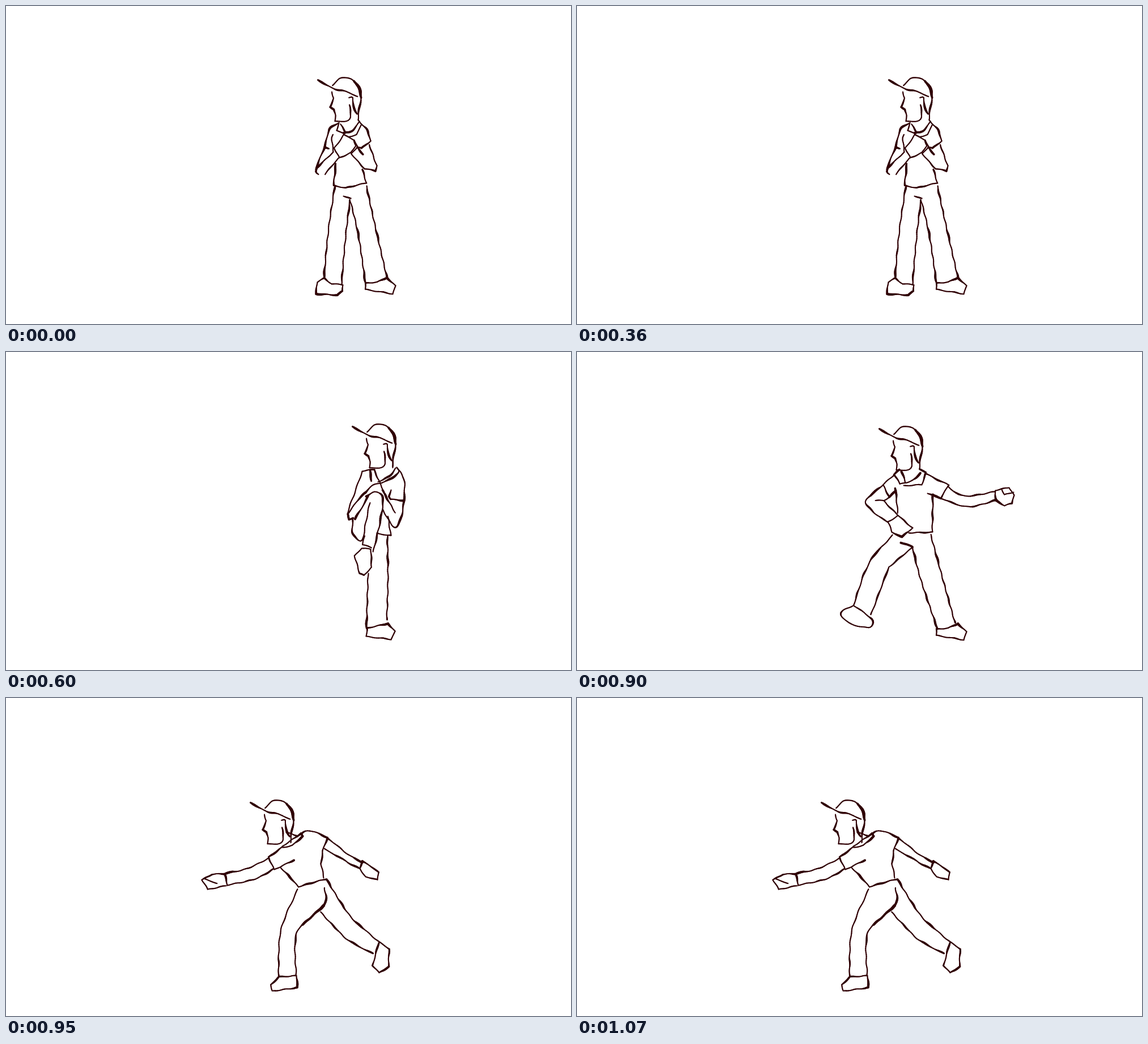
Animation of 997 by 561 pixels, one loop 1150 ms. Source, as an HTML page with a canvas:

```html
<!DOCTYPE html>
<html lang="en">
<head>
<meta charset="utf-8">
<title>Bowler sketch</title>
<style>
html, body { margin: 0; width: 100%; height: 100%; overflow: hidden; background: #fff; }
canvas { display: block; }
</style>
</head>
<body>
<canvas id="stage" width="997" height="561"></canvas>
<script>
const ctx = document.getElementById('stage').getContext('2d');
ctx.strokeStyle = '#300005';
ctx.lineCap = 'round';

// Brush pressure and tremble depend only on the place on the paper.
const pressure = (x, y) => 2.1 + 2.2 * Math.max(0, Math.sin(x / 13 + y / 9) * Math.sin(y / 17 - x / 11));
const tremble = t => 0.6 * Math.sin(t / 4);

function brush(samples, extra) {
  const shaky = samples.map(([x, y]) => [x + tremble(y + x / 2), y + tremble(x - y / 3)]);
  for (let i = 1; i < shaky.length; i++) {
    ctx.lineWidth = pressure(...samples[i]) + extra;
    ctx.beginPath();
    ctx.moveTo(...shaky[i - 1]);
    ctx.lineTo(...shaky[i]);
    ctx.stroke();
  }
}

function toPoints(coords) {
  const points = [];
  for (let i = 0; i < coords.length; i += 2) points.push([coords[i], coords[i + 1]]);
  return points;
}

// Catmull-Rom through the points, or straight edges when bend is 0.
function trace(coords, bend, extra = 0) {
  const points = toPoints(coords);
  const at = i => points[Math.max(0, Math.min(points.length - 1, i))];
  const samples = [points[0]];
  for (let i = 0; i + 1 < points.length; i++) {
    const [p, a, b, n] = [at(i - 1), at(i), at(i + 1), at(i + 2)];
    const steps = Math.ceil(Math.hypot(b[0] - a[0], b[1] - a[1]) / 3);
    for (let s = 1; s <= steps; s++) {
      const t = s / steps;
      samples.push([0, 1].map(k => {
        if (!bend) return a[k] + (b[k] - a[k]) * t;
        const m = (b[k] - p[k]) / 2, q = (n[k] - a[k]) / 2, d = b[k] - a[k];
        return a[k] + m * t + (3 * d - 2 * m - q) * t * t + (m + q - 2 * d) * t * t * t;
      }));
    }
  }
  brush(samples, extra);
}

const line = (...coords) => trace(coords, false);
const curve = (...coords) => trace(coords, true);
const heavy = (...coords) => trace(coords, true, 1.6);

function head(dx, dy) {
  ctx.save();
  ctx.translate(dx, dy);
  curve(550, 130, 576, 145, 600, 151, 621, 160);
  curve(576, 140, 590, 128, 605, 127, 619, 139, 627, 156, 623, 182, 621, 201);
  heavy(614, 133, 622, 143, 627, 162);
  line(575, 152, 578, 163, 572, 178, 579, 183, 581, 193, 581, 203);
  curve(581, 203, 595, 204, 608, 197, 606, 175);
  curve(605, 162, 612, 161, 613, 178, 620, 190);
  ctx.restore();
}

function plantedShoe() {
  line(672, 479, 687, 494, 683, 508, 634, 500, 634, 489, 655, 487, 672, 479);
}

function waiting() {
  head(0, 0);
  // collar
  line(588, 206, 583, 219, 598, 226);
  line(590, 209, 600, 224);
  curve(596, 224, 613, 219, 624, 203);
  line(621, 201, 628, 208, 618, 227, 604, 231);
  // arms and hands
  curve(587, 207, 571, 217, 562, 249, 547, 288, 552, 297);
  line(562, 249, 569, 251);
  curve(577, 227, 575, 237, 578, 258);
  line(578, 258, 548, 285);
  line(563, 297, 587, 268);
  line(597, 226, 579, 251, 588, 268, 608, 259, 617, 246, 614, 236, 597, 228);
  line(615, 236, 620, 248, 609, 261, 633, 287, 652, 291, 654, 281, 641, 244);
  curve(628, 208, 638, 220, 643, 238);
  line(643, 238, 627, 251, 619, 248, 630, 262);
  // shirt and legs
  line(582, 278, 578, 317, 600, 321, 636, 312, 629, 288);
  curve(580, 320, 569, 395, 561, 480);
  curve(607, 342, 599, 410, 592, 491);
  curve(607, 342, 622, 405, 634, 488);
  curve(636, 317, 649, 378, 672, 478);
  line(595, 335, 609, 340);
  line(561, 480, 549, 487, 547, 508, 585, 510, 594, 503, 594, 492, 575, 490, 561, 480);
  plantedShoe();
}

function kneeUp() {
  head(61, 1);
  // collar and shoulder
  line(650, 207, 629, 210, 602, 285, 606, 295, 613, 293);
  line(642, 209, 645, 228);
  line(650, 209, 667, 246);
  curve(690, 204, 692, 213, 672, 227, 645, 236, 634, 249);
  curve(656, 229, 676, 219, 688, 205);
  line(682, 193, 683, 204);
  // arms
  curve(635, 247, 620, 263, 603, 285);
  line(616, 295, 640, 253);
  heavy(603, 286, 606, 295);
  curve(690, 205, 703, 229, 699, 285, 686, 309, 664, 278);
  line(679, 244, 676, 255, 679, 260, 701, 262);
  line(664, 243, 687, 284);
  // shirt and raised leg
  line(655, 320, 679, 324, 674, 290);
  curve(636, 255, 651, 247, 665, 258, 660, 300, 648, 352);
  curve(612, 295, 612, 320, 628, 333, 634, 305, 642, 266);
  line(633, 325, 629, 340, 645, 345);
  line(627, 346, 615, 360, 624, 391, 631, 394, 645, 380, 644, 348, 628, 346);
  // standing leg
  curve(673, 323, 674, 400, 672, 472);
  line(639, 390, 636, 488);
  line(637, 487, 674, 479, 686, 493, 680, 507, 636, 502, 637, 487);
}

function backswing() {
  head(-17, 5);
  // collar
  line(569, 208, 560, 216, 570, 233, 580, 231, 573, 211);
  curve(580, 231, 597, 224, 606, 213);
  line(604, 206, 616, 213, 608, 234, 577, 236);
  // hand on hip
  curve(560, 217, 540, 234, 510, 262, 522, 281, 549, 301);
  line(540, 234, 551, 256, 563, 244);
  line(551, 256, 541, 262, 527, 262);
  line(541, 262, 567, 289);
  line(567, 289, 549, 300, 556, 318, 573, 326, 592, 310, 567, 289);
  // shirt
  line(562, 240, 566, 285);
  line(628, 252, 627, 318, 585, 319);
  // arm swung back
  line(616, 215, 656, 235, 642, 258, 618, 249);
  curve(654, 237, 684, 254, 738, 246);
  curve(642, 258, 690, 273, 740, 261);
  line(738, 244, 739, 262, 755, 271, 768, 267, 771, 252, 763, 239, 738, 244);
  line(750, 243, 754, 252, 770, 247);
  // legs
  curve(557, 323, 515, 373, 488, 447);
  line(592, 345, 550, 380, 519, 463);
  heavy(572, 336, 592, 344);
  curve(592, 344, 606, 400, 636, 489);
  curve(624, 322, 646, 402, 667, 477);
  curve(488, 447, 466, 460, 480, 478, 515, 486, 520, 471, 489, 448);
  plantedShoe();
}

function release() {
  head(-119, 54);
  // collar and back
  line(487, 264, 505, 260, 523, 244, 521, 239, 487, 262);
  line(494, 237, 514, 243);
  curve(521, 240, 536, 234, 567, 246);
  // trailing arm
  line(567, 246, 559, 270);
  curve(567, 247, 607, 278, 629, 290);
  curve(562, 266, 600, 288, 623, 301);
  line(629, 287, 624, 301, 634, 315, 656, 321, 657, 307, 629, 287);
  // throwing arm
  line(487, 263, 463, 281, 473, 303, 508, 286);
  curve(463, 283, 425, 301, 388, 309);
  curve(471, 302, 440, 319, 391, 330);
  line(391, 330, 386, 310, 364, 311, 346, 321, 356, 338, 389, 331);
  line(350, 319, 372, 327);
  // shirt
  line(559, 269, 556, 292, 561, 317);
  line(485, 299, 516, 333, 566, 319);
  // legs
  curve(515, 337, 485, 410, 481, 491);
  curve(562, 335, 561, 367, 514, 412, 512, 490);
  heavy(561, 366, 523, 400);
  curve(566, 320, 606, 383, 657, 429);
  curve(555, 377, 600, 424, 648, 451);
  line(481, 492, 467, 506, 470, 517, 514, 511, 513, 490, 481, 492);
  line(658, 430, 647, 472, 658, 485, 675, 474, 676, 443, 658, 430);
}

function poseAt(time) {
  if (time < 600) return waiting;
  if (time < 900) return kneeUp;
  return time < 950 ? backswing : release;
}

const start = performance.now();
let shown;

function render() {
  const pose = poseAt((performance.now() - start) % 1150);
  if (pose !== shown) {
    ctx.clearRect(0, 0, 997, 561);
    pose();
    shown = pose;
  }
  requestAnimationFrame(render);
}
render();
</script>
</body>
</html>
```
